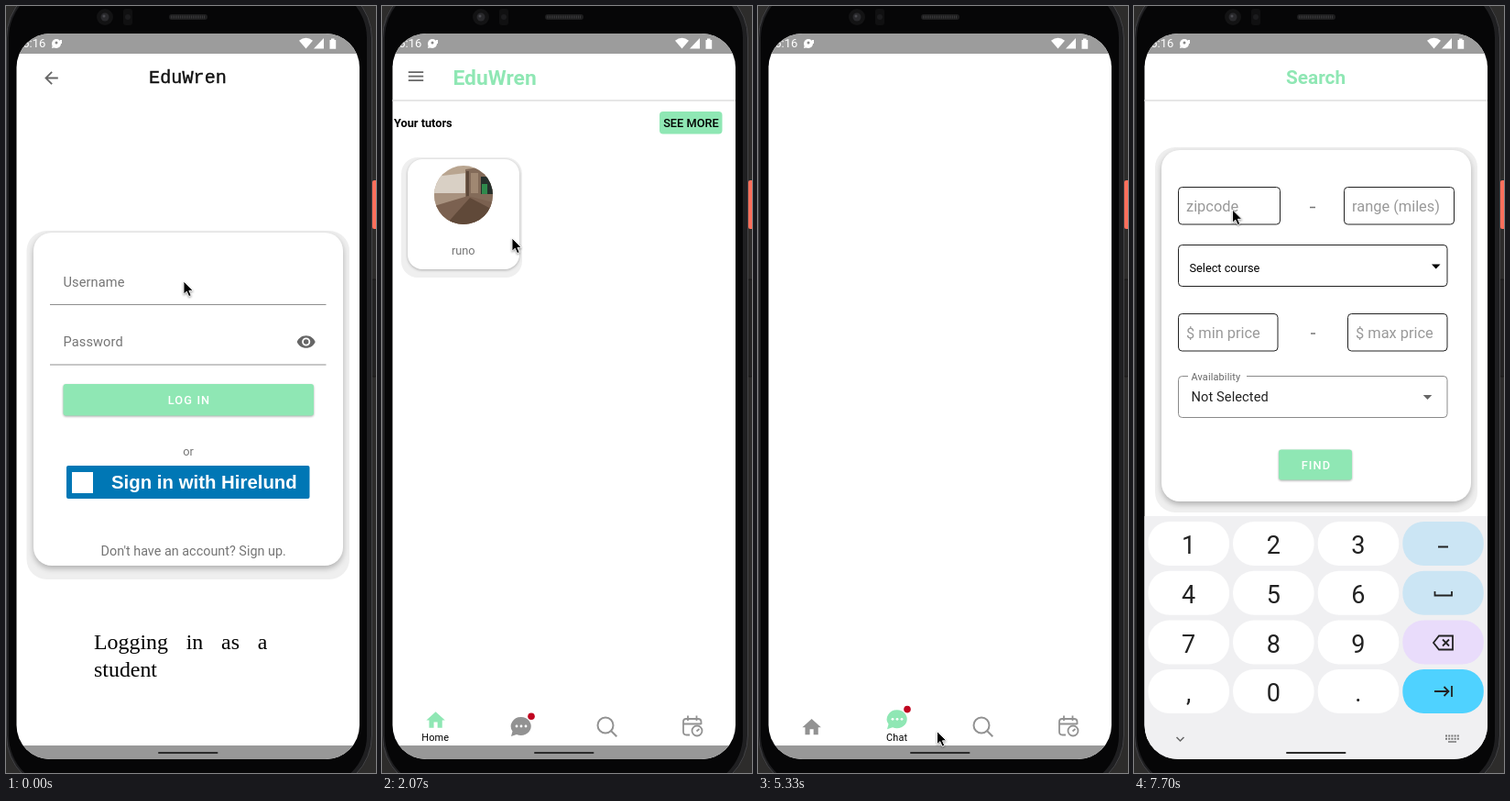
These frames come from a looping animation (404 by 836 pixels, 8 s). An HTML page:

```html
<!DOCTYPE html>
<html lang="en">
<head>
<meta charset="utf-8">
<title>Tutoring app walkthrough</title>
<style>
  html, body { margin: 0; width: 100%; height: 100%; overflow: hidden; background: #2d2c2b; }
  svg { display: block; width: 100vw; height: 100vh; }
  text { font-family: Roboto, sans-serif; font-size: 14.6px; white-space: pre; }
  .mid { text-anchor: middle; }
  .small { font-size: 12.75px; }
  .tiny { font-size: 10.9px; letter-spacing: .15px; }
  .hint { font-size: 16.4px; fill: #999; }
  .grey { fill: #757575; }
  .bold { font-weight: 700; }
  .button { font-size: 12.75px; font-weight: 500; letter-spacing: 1.14px; fill: #fff; }
  .caption { font-family: "Liberation Serif", serif; font-size: 23.9px; }
  .panel { filter: drop-shadow(0 3px 3px #0004); }
  .tile { filter: drop-shadow(0 1px 1.5px #0004); }
  .raised { filter: drop-shadow(0 1px 1px #0005); }
  .line { fill: none; stroke: currentColor; stroke-width: 2; }
  .key { font-size: 27px; fill: #222; }
</style>
</head>
<body>
<svg id="stage" viewBox="0 0 404 836" preserveAspectRatio="none"></svg>
<script>
const LOOP = 8000, STEP = LOOP / 54;
const GREEN = '#8fe7b4', GREY = '#929292';

const rect = (x1, y1, x2, y2, fill, r = 0, extra = '') =>
  `<rect x="${x1}" y="${y1}" width="${x2 - x1}" height="${y2 - y1}" rx="${r}" fill="${fill}" ${extra}/>`;
const text = (x, y, label, cls = '', extra = '') =>
  `<text x="${x}" y="${y}" class="${cls}" ${extra}>${label}</text>`;
const circle = (x, y, r, fill, extra = '') =>
  `<circle cx="${x}" cy="${y}" r="${r}" fill="${fill}" ${extra}/>`;
const path = (d, fill, extra = '') => `<path d="${d}" fill="${fill}" ${extra}/>`;
const stroke = (d, color, width = 2, dash = 'none') =>
  path(d, 'none', `stroke="${color}" stroke-width="${width}" stroke-dasharray="${dash}"`);
const icon = (d, x, y, fill, scale = .91) =>
  path(d, fill, `fill-rule="evenodd" transform="translate(${x} ${y}) scale(${scale}) translate(-12 -12)"`);
const group = (id, content) => `<g id="${id}">${content}</g>`;
const outline = (x1, y1, x2, y2, color = '#222') =>
  rect(x1, y1, x2, y2, 'none', 4, `stroke="${color}"`);
const card = (outer, inner, r, cls) =>
  rect(...outer, '#efefef', r + 2) + rect(...inner, '#fff', r, `class="${cls}"`);

const phone = () =>
  rect(399, 298, 405, 404, '#232222', 2, 'stroke="#181717"') +
  rect(400, 190, 407, 243, '#ff6f5b', 2) +
  rect(.5, -25, 399.5, 855, '#1f1f21', 60, 'stroke="#434346"') +
  rect(3, -22, 394, 852, '#060607', 57) +
  circle(108, 12, 9, '#131314') + circle(108, 12, 4.5, '#29292c') + circle(107, 11, 1.5, '#4a4a50') +
  rect(128, 3, 138, 21, '#101011', 3) + circle(133, 12, 3, '#1c1c1e') +
  rect(178, 9, 220, 15, '#1e1e1f', 3) +
  stroke('M180 12H218', '#38383a', 3, '1 1');

const statusBar = () =>
  rect(11, 30, 387, 52, '#9c9c9c') +
  text(18.3, 45.3, '6:16', '', 'fill="#fff" style="font-size:13px"') +
  circle(55, 41, 5, '#fff') + circle(55, 40, 1.5, '#888') +
  path('M50 46l1-4 4 3zM59 37h2v4h-2z', '#fff') +
  path('M327.5 46.5L320 37.7Q327.5 32 335 37.7ZM336 46.5H347V35ZM353.5 37H355V35.5H358.5V37H360.2V46.8H353.5Z', '#fff');

const login = () =>
  icon('M20 11H7.83l5.59-5.59L12 4l-8 8 8 8 1.41-1.41L7.83 13H20v-2z', 49.5, 78.5, '#666') +
  text(198.5, 83.5, 'EduWren', 'mid',
    'fill="#111" stroke="#111" stroke-width=".4" style="font-family:\'Liberation Mono\',monospace;font-size:20.2px"') +
  card([22.5, 245, 375, 625], [30, 247, 368, 610], 20, 'panel') +
  text(62.5, 305.5, 'Username', 'grey', 'letter-spacing=".1"') +
  text(62.5, 371, 'Password', 'grey', 'letter-spacing=".1"') +
  stroke('M48 325.5H349.5M48 391H349.5', '#8f8f8f', 1) +
  icon('M12 4.5C7 4.5 2.73 7.61 1 12c1.73 4.39 6 7.5 11 7.5s9.27-3.11 11-7.5c-1.73-4.39-6-7.5-11-7.5z' +
    'M12 17a5 5 0 1 1 0-10 5 5 0 0 1 0 10zM12 9a3 3 0 1 0 0 6 3 3 0 0 0 0-6z', 327.7, 366, '#666') +
  rect(62.5, 412, 336, 446.5, GREEN, 3, 'class="raised"') +
  text(200, 434, 'LOG IN', 'button mid') +
  text(199, 490, 'or', 'small grey mid') +
  rect(66, 501, 331.5, 537, '#0077b5', 2) +
  rect(72, 508, 95, 531, '#fff') +
  text(115, 526, 'Sign in with Hirelund', 'bold',
    'fill="#fff" style="font-family:\'Liberation Sans\',sans-serif;font-size:20.4px"') +
  text(204.7, 599, "Don't have an account? Sign up.", 'grey mid', 'style="font-size:14.4px"') +
  group('loginCaption',
    text(96, 701, 'Logging in as a', 'caption', 'word-spacing="13.8"') + text(96, 731, 'student', 'caption'));

const avatar = () =>
  `<g clip-path="url(#avatarClip)">` +
  rect(57, 174, 121, 238, '#b9a590') +
  path('M57 186L92 182V208H57Z', '#d9d0c5') +
  path('M57 204H93V238H57Z', '#a8927f') +
  path('M91 178L121 174V238L91 208Z', '#836b59') +
  rect(92, 180, 95, 208, '#5d4839') + rect(97, 182, 105, 204, '#a08872') +
  path('M57 218L94 207L121 214V238H57Z', '#7b6150') +
  path('M70 238L96 209L121 222V238Z', '#604939') +
  rect(108, 186, 121, 205, '#26302c') + rect(109, 194, 115, 205, '#2f8a4c') + '</g>';

const home = () =>
  icon('M3 18h18v-2H3v2zm0-5h18v-2H3v2zm0-7v2h18V6H3z', 37, 76.6, '#666') +
  text(77.5, 86, 'EduWren', 'bold', `fill="${GREEN}" style="font-size:22.8px"`) +
  text(13, 132.3, 'Your tutors', 'small bold') +
  rect(303, 115, 371.5, 139.5, GREEN, 4) +
  text(337.4, 132.3, 'SEE MORE', 'small mid', 'font-weight="500"') +
  card([21, 165, 153, 296], [28, 167, 150, 287], 16, 'tile') +
  avatar() +
  text(88.8, 271, 'runo', 'small grey mid') +
  group('homeCaption', text(67, 628.3, 'Student’s home page', 'caption'));

const search = () =>
  text(198.5, 85, 'Search', 'bold mid', `fill="${GREEN}" style="font-size:20.8px"`) +
  card([23, 154, 375, 552], [30, 157, 368, 540], 20, 'panel') +
  outline(48.5, 197.5, 159.5, 238) + text(57, 224, 'zipcode', 'hint') +
  outline(229.5, 197.5, 349.5, 238) + text(238, 224, 'range (miles)', 'hint') +
  outline(48.5, 260.5, 342, 305.5) + text(60.5, 290, 'Select course', 'small') +
  path('M325 281.5H334.5L329.7 286.5Z', '#000') +
  outline(48.5, 335.5, 157, 376) + text(57, 361.5, '$ min price', 'hint') +
  outline(233.5, 335.5, 342, 376) + text(242, 361.5, '$ max price', 'hint') +
  stroke('M192 219.5H198M193 357H198', '#757575', 1.5) +
  outline(48.5, 403.5, 342, 448.5, '#8a8a8a') +
  rect(59, 401, 123, 406, '#fff') + text(62.5, 408, 'Availability', 'tiny', 'fill="#666"') +
  text(62.5, 431.3, 'Not Selected', '', 'fill="#222" letter-spacing=".1"') +
  path('M315.7 424H325.3L320.5 429Z', '#666') +
  rect(158, 483.5, 238, 516.5, GREEN, 3, 'class="raised"') +
  text(199, 504.5, 'FIND', 'button mid') +
  group('caret', rect(57, 206, 59, 229, '#03dac5'));

const tabs = [
  ['Home', 58.3, icon('M10 20v-6h4v6h5v-8h3L12 3 2 12h3v8z', 58.6, 786.2, 'currentColor', 1.02)],
  ['Chat', 151.7,
    path('M152 775a11 10 0 1 1-5 19l-6 2 1.5-5.5A11 10 0 0 1 152 775Z', 'currentColor') +
    [147, 152, 157].map(x => circle(x, 785, 1.4, '#fff')).join('') + circle(163, 774.3, 3.8, '#c00520')],
  ['Search', 245, '<g class="line">' + circle(244, 784, 8.5, 'none') + '<path d="M250 790L256.3 796.3"/></g>'],
  ['', 339,
    '<g class="line" style="stroke-width:1.8"><path d="M336 794.5H332.5Q329 794.5 329 791V780Q329 777 332 777H345' +
    'Q348.5 777 348.5 780V783M329 782.5H348.5M334 773.5V779M343.5 773.5V779"/>' +
    circle(344, 790, 5.5, 'none') + '<path d="M343.5 790.5L346.5 788"/></g>'],
];
const nav = () => tabs.map(([label, x, shape], i) =>
  `<g id="tab${i}">${shape}</g>` + text(x, 801.3, label, 'tiny mid', `id="label${i}"`)).join('');

const keyboard = () => {
  const rows = ['123', '456', '789', ',0.'];
  const accents = ['#cbe5f4', '#cbe5f4', '#e9dcfb', '#4fd2ff'];
  let out = rect(11, 556, 387, 930, '#f0f0f2');
  rows.forEach((row, r) => {
    const y = 562 + r * 53.7;
    for (let c = 0; c < 4; c++) {
      const x = 15.5 + c * 92.6;
      out += rect(x, y, x + 88.5, y + 48, c < 3 ? '#fff' : accents[r], 23);
      if (c < 3) out += text(x + 44.2, y + 35.3, row[c], 'key mid');
    }
  });
  return out +
    stroke('M332 589.5H343M328.5 638V642.5H347V638M327 694L333 686.5H348V701.5H333ZM337 690.5L344 697.5M344 690.5L337 697.5' +
      'M328 747H343M338.5 742L343.5 747L338.5 752M347 741V753', '#222', 1.8) +
    stroke('M46.5 797L50.5 801L54.5 797', '#666', 1.5) +
    stroke('M340 795.5H355M340 798.8H355', '#777', 2, '2 1.2') +
    stroke('M343 802H352', '#777', 1.5);
};

document.getElementById('stage').innerHTML =
  `<clipPath id="screenClip">${rect(11.5, 30, 386, 821, '#fff', 37)}</clipPath>
   <clipPath id="avatarClip">${circle(89, 206, 32, '#fff')}</clipPath>` +
  phone() +
  '<g clip-path="url(#screenClip)">' + rect(11, 30, 387, 822, '#fff') + statusBar() +
  group('login', login()) + group('home', home()) + group('search', search()) +
  group('divider', rect(11, 102, 387, 104, '#e6e6e6')) +
  group('nav', nav()) + rect(11, 806, 387, 822, '#989898') +
  group('keyboard', keyboard()) + '</g>' +
  rect(166, 813, 231.5, 815, '#2b2b2b', 1) +
  group('cursor', path('M0 0V14.2L3.3 11.2L5.7 16.6L8.2 15.5L5.9 10.3H10.3Z', '#000',
    'stroke="#fff" stroke-width=".9" style="filter:drop-shadow(0 1px 1px #0006)"'));

// Pointer positions as [step, x, y]
const pointer = [
  [0, 194, 300], [5, 277, 587], [6, 312, 700], [7, 306, 779], [9, 297, 814], [10, 297, 814],
  [11, 192, 426], [14, 142, 253], [15, 142, 253], [21, 46, 127], [23, 68, 237],
  [27, 180, 600], [29, 224, 818], [31, 152, 802], [32, 145, 797], [34, 145, 797],
  [38, 246, 784], [39, 244.5, 784], [41, 244.5, 784], [48, 105, 212], [49, 107.5, 222], [54, 107.5, 222],
];
function pointerAt(step) {
  const i = pointer.findIndex(p => p[0] > step);
  const [s0, x0, y0] = pointer[i - 1], [s1, x1, y1] = pointer[i];
  const f = (step - s0) / (s1 - s0);
  return [x0 + (x1 - x0) * f, y0 + (y1 - y0) * f];
}

const el = id => document.getElementById(id);
const show = (id, on) => { el(id).style.display = on ? '' : 'none'; };

function render(time) {
  const step = Math.min(53, Math.floor((time % LOOP + 12) / STEP));
  const page = step < 11 ? 'login' : step < 34 ? 'home' : step < 41 ? 'chat' : 'search';
  for (const id of ['login', 'home', 'search']) show(id, id === page);
  show('nav', page !== 'login');
  show('divider', page === 'home' || step >= 42);
  show('loginCaption', step < 3);
  show('homeCaption', step < 13);
  show('caret', step >= 48 && step < 52);
  show('keyboard', step >= 49);
  el('keyboard').setAttribute('transform', `translate(0 ${step === 49 ? 60 : 0})`);

  const tinted = { home: 0, chat: 1, search: 2 }[page];
  const lifted = step === 41 ? 1 : tinted;
  tabs.forEach((_, i) => {
    el('tab' + i).style.color = i === tinted ? GREEN : GREY;
    el('tab' + i).setAttribute('transform', `translate(0 ${i === lifted ? -7.7 : 0})`);
    show('label' + i, i === lifted);
  });
  el('cursor').setAttribute('transform', `translate(${pointerAt(step)})`);
}

function loop() {
  render(performance.now());
  requestAnimationFrame(loop);
}
loop();
</script>
</body>
</html>
```
